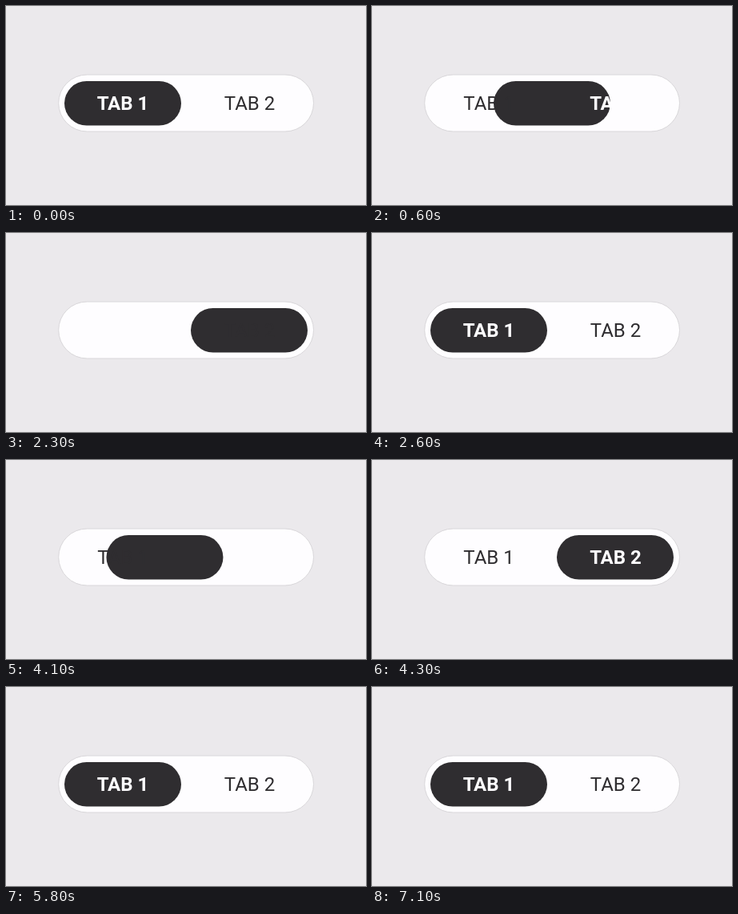
Write an HTML page that moves like this. It is 450x249 px and loops after 8000 ms.

```html
<!DOCTYPE html>
<html lang="en">
<head>
<meta charset="utf-8">
<title>Tab switch</title>
<style>
  html, body { margin: 0; width: 100%; height: 100%; overflow: hidden; background: #ebe9ec; }
  svg { display: block; width: 100%; height: 100%; }
  .track { fill: #fefdff; stroke: #d9d7da; stroke-width: 1; }
  .pill { fill: #2f2d30; }
  text { font: 400 24px Roboto, sans-serif; text-anchor: middle; fill: #2f2d30; }
  text.active { font-weight: 700; fill: #fefdff; }
</style>
</head>
<body>
<svg viewBox="0 0 450 249">
  <rect class="track" x="65.7" y="86" width="318.8" height="71" rx="35.5"/>
  <rect class="pill" id="pill" x="73" y="94" width="146" height="55.5" rx="27.75"/>
  <text x="146" y="130">TAB 1</text>
  <text x="304.5" y="130">TAB 2</text>
</svg>
<script>
  const LOOP = 8000, STEP = 100, SLIDE = 220;
  const LEFT = 73, TRAVEL = 158;

  // Labels swap at once; the pill slides beneath them.
  const moves = [
    { swap: 500, start: 490, tab: 1 },
    { swap: 2300, start: 2340, tab: 0 },
    { swap: 4100, start: 4014, tab: 1 },
    { swap: 5600, start: 5527, tab: 0 }
  ];

  const pill = document.getElementById('pill');
  const labels = document.querySelectorAll('text');
  const ease = p => (1 - Math.cos(Math.PI * p)) / 2;

  function draw(time) {
    const t = Math.floor((time % LOOP) / STEP) * STEP;
    let active = 0, position = 0;
    for (const { swap, start, tab } of moves) {
      if (t < swap) break;
      const progress = Math.min(1, Math.max(0, (t - start) / SLIDE));
      position = 1 - tab + (2 * tab - 1) * ease(progress);
      active = tab;
    }
    pill.setAttribute('x', LEFT + TRAVEL * position);
    labels.forEach((label, i) => label.classList.toggle('active', i === active));
  }

  const origin = performance.now();
  function tick() {
    draw(performance.now() - origin);
    requestAnimationFrame(tick);
  }
  tick();
</script>
</body>
</html>
```
